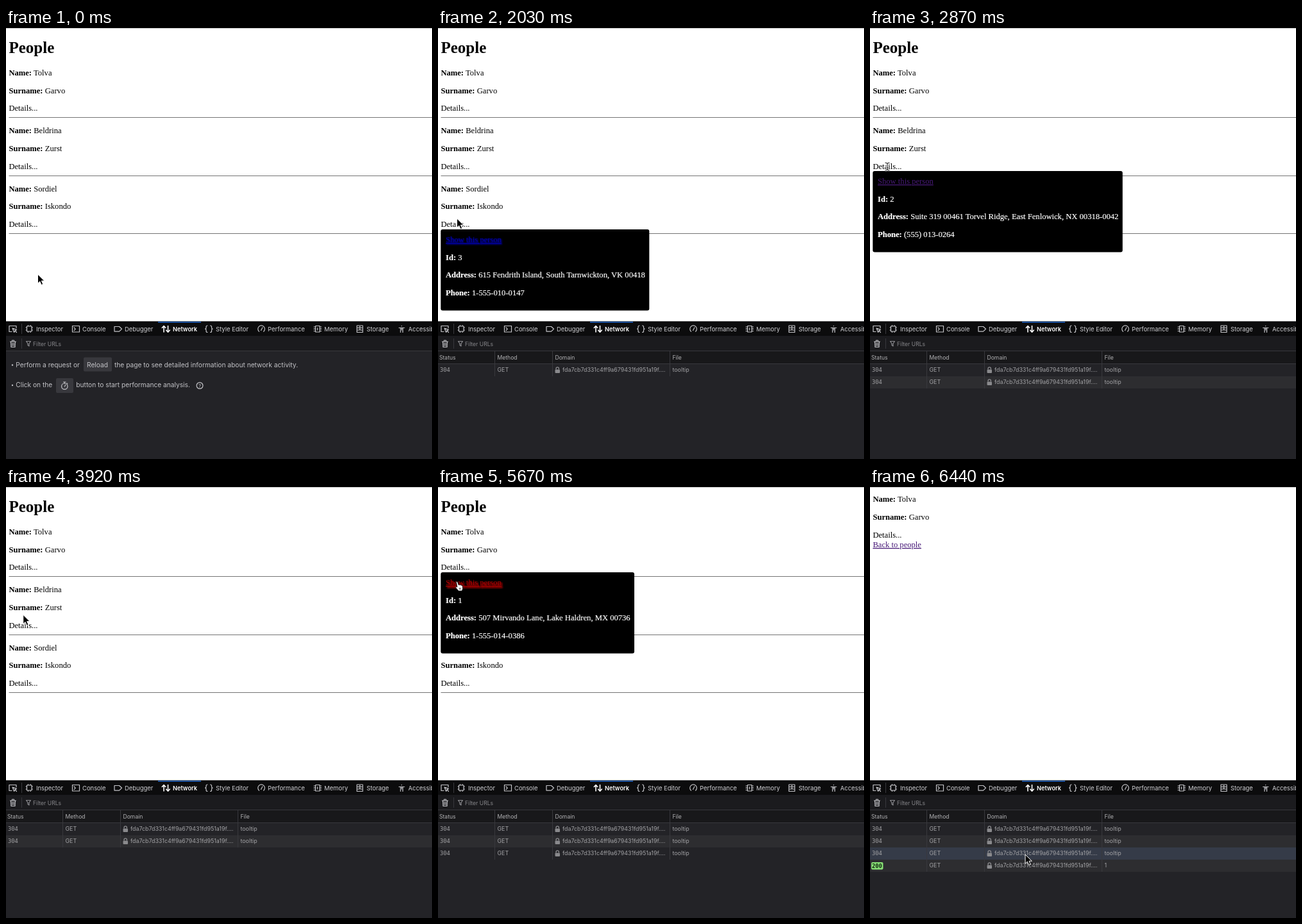
These frames come from a looping animation (664 by 672 pixels, 6580 ms). An HTML page:

```html
<!DOCTYPE html>
<html lang="en">
<head>
<meta charset="utf-8">
<title>People</title>
<style>
  html, body { margin: 0; width: 100%; height: 100%; overflow: hidden; background: #fff; }
  svg { display: block; width: 100%; height: 100%; }
  text { white-space: pre; }
  .page { font: 12.6px "Liberation Serif", serif; fill: #000; }
  .page .title { font-size: 25px; font-weight: bold; }
  .rule { stroke: #747474; }
  .tip { fill: #fff; }
  .tip text:not(.link) { stroke: #fff; stroke-width: .2; }
  .link { fill: #481a78; text-decoration: underline; }
  .fresh { fill: #0000a8; filter: drop-shadow(1px 1px 1px #00d); }
  .hover { fill: #a80000; filter: drop-shadow(2px 2px 1px #f00); }
  .tools { font: 8.6px Inter, sans-serif; fill: #b1b1b3; }
  .tabs { font-size: 9.45px; fill: #d0d0d4; }
  .hint { font-size: 10.2px; fill: #c2c2c6; }
  .dim { fill: #87878b; }
  .icon { fill: none; stroke: #c4c4c8; stroke-width: 1.2; stroke-linecap: round; stroke-linejoin: round; }
  .active { fill: #fff; font-weight: 600; font-size: 9.2px; }
  .active .icon { stroke: #fff; stroke-width: 1.6; }
  .faint .icon { stroke: #8c8c90; }
  .row { font-size: 8.85px; fill: #a2a2a5; }
  .code { font: 8.8px "DejaVu Sans Mono", monospace; }
  .ok { fill: #10240f; }
  .line { stroke: #38383d; }
  .b { font-weight: bold; }
</style>
</head>
<body>
<svg id="stage" viewBox="0 0 664 672"></svg>
<script>
const TICK = 70, TICKS = 94, PITCH = 90.4;

const people = [
  { first: 'Tolva', last: 'Garvo', address: '507 Mirvando Lane, Lake Haldren, MX 00736', phone: '1-555-014-0386', right: 306 },
  { first: 'Beldrina', last: 'Zurst', address: 'Suite 319 00461 Torvel Ridge, East Fenlowick, NX 00318-0042', phone: '(555) 013-0264', right: 393.7 },
  { first: 'Sordiel', last: 'Iskondo', address: '615 Fendrith Island, South Tarnwickton, VK 00418', phone: '1-555-010-0147', right: 329.3 },
];

const text = (x, y, s, cls = '') => `<text x="${x}" y="${y}" class="${cls}">${s}</text>`;
const field = (x, y, label, value) => text(x, y, `<tspan class="b">${label}:</tspan> ${value}`);
const rect = (x, y, w, h, fill, rx = 0) => `<rect x="${x}" y="${y}" width="${w}" height="${h}" rx="${rx}" fill="${fill}"/>`;
const icon = d => `<path class="icon" d="${d}"/>`;
const ring = (x, y, r) => `<circle class="icon" cx="${x}" cy="${y}" r="${r}"/>`;
const group = (id, body, cls = '') => `<g id="${id}" class="${cls}">${body}</g>`;

const person = (p, y) =>
  field(4.4, y, 'Name', p.first) + field(4.4, y + 27.8, 'Surname', p.last) + text(4.4, y + 55.5, 'Details...');

const rule = i => `<path class="rule" d="M4.5 ${Math.floor(139.6 + i * PITCH) + 0.5}H664"/>`;

function tips(p, i) {
  const x = 4.3, y = Math.round(132.8 + i * PITCH);
  const loading = rect(x, y, 67.2, 31, '#000', 3) + text(12, y + 19.5, 'Loading...');
  const details = rect(x, y, p.right - x, 126.4, '#000', 3)
    + `<text id="link${i}" x="12" y="${y + 20}" class="link">Show this person</text>`
    + field(12, y + 47.5, 'Id', i + 1)
    + field(12, y + 75.2, 'Address', p.address)
    + field(12, y + 102.9, 'Phone', p.phone);
  return group('loading' + i, loading, 'tip') + group('details' + i, details, 'tip');
}

const list = text(4.5, 39, 'People', 'title')
  + people.map((p, i) => person(p, 73.8 + i * PITCH) + rule(i)).join('')
  + people.map(tips).join('');

const single = person(people[0], 23.1) + text(4.4, 94, 'Back to people', 'link');

const tabs = [
  [47, 'Inspector', 'M32.5 465h7.5v8h-7.5zM34.5 465v-1.500M38 465v-1.500M34.5 473v1.500M38 473v1.500M32.5 467h-1.500M32.5 471h-1.500M40 467h1.500M40 471h1.500'],
  [119, 'Console', 'M103.500 464.500h11v9.500h-11zM106 467l2.300 2.300-2.300 2.300'],
  [185, 'Debugger', 'M169 465.500h7.500l4 3.800-4 3.800h-7.500z'],
  [260, 'Network', 'M246 474v-9M243.300 467.500l2.700-3 2.700 3M252.500 464.500v9M249.800 471.200l2.700 3 2.700-3'],
  [327, 'Style Editor', 'M314 464q-2 0-2 2v1.500q0 1.500-1.500 1.700 1.500.3 1.500 1.800v1.500q0 2 2 2M318.500 464q2 0 2 2v1.500q0 1.500 1.500 1.700-1.500.3-1.500 1.800v1.500q0 2-2 2'],
  [408, 'Performance', 'M394.500 473.200a5.300 5.300 0 1 1 7 0M397.500 471.500l2.300-4.500'],
  [496, 'Memory', 'M482.500 464.500h6.500v9.500h-6.500zM485.500 467.500v3.500M482 466h-2M482 469.200h-2M482 472.500h-2M489.500 466h2M489.500 469.200h2M489.500 472.500h2'],
  [562, 'Storage', 'M547 464h9v10.500h-9zM547 467.500h9M547 471h9M550.500 465.800h2M550.500 469.300h2'],
  [627, 'Accessibility', 'M612.500 467.500h8.500M616.700 467.500v3.500M615 468v6.500M618.500 468v6.500M616.700 464.300v.5'],
];

const tab = ([x, label, d]) =>
  `<g class="${label === 'Network' ? 'active' : ''}">${icon(d)}${text(x, 473, label)}</g>`;

const toolbar = rect(0, 457.5, 664, 214.5, '#232327') + rect(0, 457.5, 664, 22.5, '#0c0c0d')
  + rect(0, 480, 664, 24, '#1b1b1e') + rect(237, 458, 67, 1.3, '#1f6fe0')
  + '<path class="line" d="M24.5 461V477M24.5 484V500M0 503.500H664"/>'
  + icon('M9 473.500H5V464.500H16V468M10 468l6.500 2.600-2.700 1.100-1.100 2.700zM14 472l2.500 2.500')
  + icon('M6.500 489h9M9.500 488.500v-1.500h3v1.500M7.500 489l.5 8.500h6l.5-8.500M9.800 491v4.500M12.200 491v4.500')
  + `<g class="faint">${icon('M31.5 488.500h7l-2.500 3.500v4l-2-1.500v-2.500z')}</g>`
  + text(42, 495.5, 'Filter URLs', 'dim')
  + `<g class="tabs">${tabs.map(tab).join('')}</g>`;

const hint = rect(121, 513.5, 44, 22, '#38383d', 2) + rect(78, 546, 27, 23, '#38383d', 2)
  + '<circle cx="10" cy="525.5" r="1.2"/><circle cx="10" cy="557" r="1.2"/>'
  + text(15.3, 528.5, 'Perform a request or') + text(126, 528.5, 'Reload')
  + text(169, 528.5, 'the page to see detailed information about network activity.')
  + text(15.3, 560.3, 'Click on the') + text(109.3, 560.3, 'button to start performance analysis.')
  + ring(91.3, 558.7, 4.7) + icon('M89.5 552h3.600M91.3 552v2M91.3 559l1.500-2.500M95 554l.8.8')
  + ring(302, 557.5, 4.9) + '<text x="302" y="560.5" font-size="8" text-anchor="middle">?</text>';

const columns = (y, h) => [88.5, 178.5, 361.5].map(x => `<path class="line" d="M${x} ${y}v${h}"/>`).join('');

const header = rect(0, 504, 664, 19.5, '#18181a')
  + text(2, 517, 'Status') + text(92.5, 517, 'Method') + text(182.5, 517, 'Domain') + text(365.5, 517, 'File')
  + columns(504, 20) + '<path class="line" d="M0 523.5H664"/>';

function request(file, i) {
  const y = 524 + i * 19, base = y + 12.2;
  const status = file === 'tooltip'
    ? text(3, base, '304', 'code')
    : rect(2, y + 4, 18.5, 11.5, '#86de74', 2) + text(3, y + 13, '200', 'code b ok');
  return group('row' + i,
    `<rect id="band${i}" y="${y}" width="664" height="19"/>` + status + text(92.5, base, 'GET')
    + rect(182.5, y + 8.5, 7.5, 5.5, '#8a8a8d', 1)
    + `<path d="M184 ${y + 8.5}v-1.5a2.2 2.2 0 0 1 4.4 0v1.5" fill="none" stroke="#8a8a8d" stroke-width="1.3"/>`
    + text(194, base, 'fda7cb7d331c4ff9a679431fd951a19f.…')
    + text(365.5, base, file) + columns(y, 19), 'row');
}
const requests = ['tooltip', 'tooltip', 'tooltip', '1'].map(request).join('');

const beam = (color, width) =>
  `<path d="M-3.5-6Q0-6 0-3.5Q0-6 3.5-6M0-4V4M-3.5 6Q0 6 0 3.5Q0 6 3.5 6M-1.5 2H1.5" fill="none" stroke="${color}" stroke-width="${width}"/>`;

const cursors = group('cursor',
  group('arrow', '<path d="M0 0V14.2L3.3 11.1 5.6 16.5 8.2 15.4 5.9 10.2H10.3Z" fill="#000" stroke="#fff"/>')
  + group('beam', beam('#fff', 2.6) + beam('#222', 1.1))
  + group('hand', '<path d="M-.5.5Q0-1.5 1.5 0L3.3 5Q4.5 3.6 5.5 5Q6.8 4 7.5 5.5Q9.2 5 9.4 7Q10 11 8.5 14H2.8Q1 11-1.7 8.8Q-1.5 6.8.9 8Z" fill="#fff" stroke="#000" stroke-width=".8"/><path d="M4.3 9v3M6.2 9v3" stroke="#000" stroke-width=".7"/>'));

document.getElementById('stage').innerHTML =
  rect(0, 0, 664, 672, '#fff')
  + group('list', list, 'page') + group('single', single, 'page')
  + rect(0, 0, 664, 1, '#bdbdbd')
  + `<g class="tools">${toolbar}${group('hint', hint, 'hint')}${group('table', header + requests)}</g>`
  + cursors;

// Cursor waypoints: tick, x, y
const path = [
  [0, 49.5, 384], [4, 50, 384], [14, 29, 304], [17, 29, 300], [28, 29, 300], [29, 29.5, 297],
  [38, 27, 217], [41, 27, 216], [53, 27, 216], [63, 26, 139], [64, 26, 130], [66, 26, 122],
  [68, 26, 120], [71, 26, 120], [75, 6, 136], [78, 12, 158], [81, 29, 148], [89, 29, 148],
  [90, 60, 210], [91, 175, 440], [92, 242, 573], [94, 242, 573],
];
const shapes = [[0, 'arrow'], [13, 'beam'], [29, 'arrow'], [36, 'beam'], [54, 'arrow'], [64, 'beam'], [73, 'arrow'], [80, 'hand'], [84, 'arrow']];

// Visible spans in ticks, end exclusive
const spans = {
  list: [0, 83], single: [83, TICKS], hint: [0, 16], table: [16, TICKS],
  loading2: [13, 17], details2: [17, 30],
  loading1: [37, 41], details1: [41, 55],
  loading0: [65, 68], details0: [68, 83],
  row0: [16, TICKS], row1: [40, TICKS], row2: [67, TICKS], row3: [83, TICKS],
};

const el = id => document.getElementById(id);
const show = (id, on) => { el(id).style.display = on ? '' : 'none'; };

function cursorAt(tick) {
  const n = path.findIndex(p => p[0] > tick);
  const [t0, x0, y0] = path[n - 1], [t1, x1, y1] = path[n];
  const k = (tick - t0) / (t1 - t0);
  const e = t1 - t0 > 5 ? k * k * (3 - 2 * k) : k;
  return [x0 + (x1 - x0) * e, y0 + (y1 - y0) * e];
}

el('link2').classList.add('fresh');

function draw() {
  const tick = Math.floor(performance.now() / TICK) % TICKS;
  for (const id in spans) show(id, tick >= spans[id][0] && tick < spans[id][1]);

  const shape = shapes.filter(s => s[0] <= tick).pop()[1];
  for (const id of ['arrow', 'beam', 'hand']) show(id, id === shape);
  el('cursor').setAttribute('transform', `translate(${cursorAt(tick)})`);

  el('link0').classList.toggle('hover', tick >= 80);
  for (let i = 0; i < 4; i++) {
    const hovered = i === 2 && tick >= 92;
    el('band' + i).setAttribute('fill', hovered ? '#353b48' : i % 2 ? '#2d2d30' : '#232327');
  }
  requestAnimationFrame(draw);
}
draw();
</script>
</body>
</html>
```
